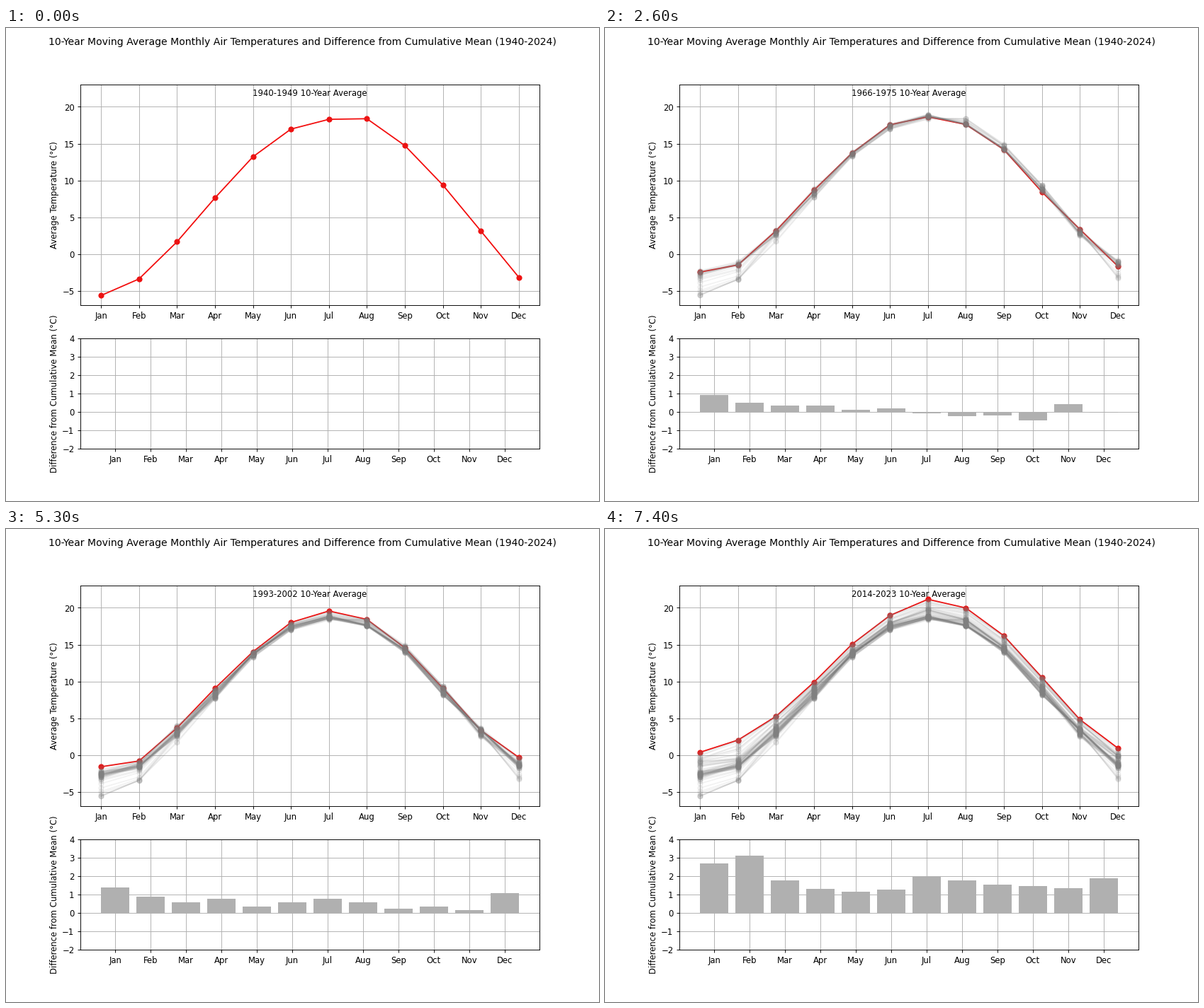
A matplotlib script that plays this animation: 837x669 px, repeating every 7500 ms.

```python
import numpy as np
import matplotlib.pyplot as plt
from matplotlib.animation import FuncAnimation

plt.rcParams["font.family"] = "DejaVu Sans"

DPI = 83.7
FRAMES = 75
START = 1940
WINDOW = 10
MONTHS = "Jan Feb Mar Apr May Jun Jul Aug Sep Oct Nov Dec".split()
x = np.arange(12)


def seasonal(mean, c1, s1, c2, s2):
    """Yearly cycle from a mean, an annual and a half-year wave."""
    a = 2 * np.pi * x / 12
    return (mean + c1 * np.cos(a) + s1 * np.sin(a)
            + c2 * np.cos(2 * a) + s2 * np.sin(2 * a))


def window_means():
    """Cold early years fade out, late warming fades in, weather on top."""
    i = np.arange(FRAMES)[:, None]
    u = np.clip(i / 12, 0, 1)
    early = 1 - u * u * (3 - 2 * u)
    late = np.clip((i - 38) / 36, 0, 1) ** 1.5

    rng = np.random.default_rng(7)
    spread = 0.9 + 0.4 * np.cos(2 * np.pi * x / 12)
    total = np.cumsum(rng.normal(0, spread, (FRAMES + WINDOW, 12)), axis=0)
    weather = (total[WINDOW:] - total[:-WINDOW]) / WINDOW

    return (seasonal(8.37, -10.83, -0.21, -0.38, 0.12)
            + early * seasonal(-0.62, -1.15, -0.53, -0.74, 0.12)
            + late * seasonal(1.94, 0.29, -0.06, 0.55, 0.37)
            + weather)


temps = window_means()
running = np.cumsum(temps, axis=0) / np.arange(1, FRAMES + 1)[:, None]
diffs = temps - running

fig, (top, low) = plt.subplots(
    2, 1, figsize=(837.01 / DPI, 669.01 / DPI), dpi=DPI, height_ratios=[2, 1])
fig.suptitle("10-Year Moving Average Monthly Air Temperatures and "
             "Difference from Cumulative Mean (1940-2024)", fontsize=12)


def style(ax, xlim, ylim, yticks, label):
    ax.set_xlim(*xlim)
    ax.set_ylim(*ylim)
    ax.set_xticks(x, MONTHS)
    ax.set_yticks(yticks)
    ax.set_ylabel(label)
    ax.grid(True)


style(top, (-0.55, 11.55), (-7, 23), range(-5, 21, 5), "Average Temperature (°C)")
style(low, (-0.99, 11.99), (-2, 4), range(-2, 5), "Difference from Cumulative Mean (°C)")

current, = top.plot(x, temps[0], "o-", color="red")
trail = [top.plot(x, row, "o-", color="gray", alpha=0.1)[0] for row in temps]
bars = low.bar(x, diffs[0], color="#b0b0b0")
caption = top.text(0.5, 0.95, "", transform=top.transAxes, ha="center")


def update(i):
    current.set_ydata(temps[i])
    for j, line in enumerate(trail):
        line.set_visible(j <= i)
    for bar, height in zip(bars, diffs[i]):
        bar.set_height(height)
    caption.set_text(f"{START + i}-{START + i + WINDOW - 1} 10-Year Average")
    return [current, *trail, *bars, caption]


anim = FuncAnimation(fig, update, frames=FRAMES, interval=100,
                     repeat=True, repeat_delay=0, blit=False)
plt.show()
```
